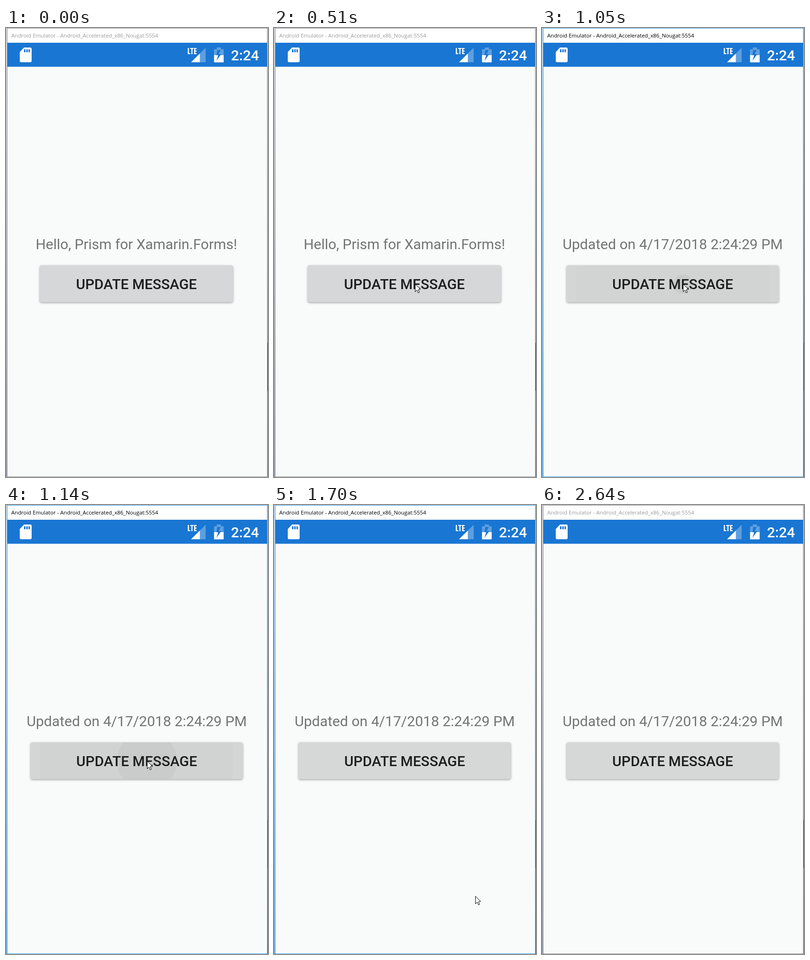
Recreate the animation shown at these times as an HTML page with a canvas. Size 552 px wide and 944 px high, loop 2.86 s.

```html
<!DOCTYPE html>
<html lang="en">
<head>
<meta charset="utf-8">
<title>Emulator</title>
<style>
html, body { margin: 0; width: 100%; height: 100%; overflow: hidden; background: #f9fbfa; }
canvas { display: block; width: 552px; height: 944px; }
</style>
</head>
<body>
<canvas id="stage" width="552" height="944"></canvas>
<script>
const ctx = document.getElementById('stage').getContext('2d');
const LOOP = 2860, W = 552, H = 944;
const ENTER = 130, REST = 510, FOCUS = 740, CLICK = 1050, MOVE = 1130,
  SPREAD = 1380, CALM = 1530, GONE = 2000, BLUR = 2640;
const BLUE = '#1976d3', PAGE = '#f9fbfa', FADED = 'rgba(255,255,255,.3)';

const clamp = v => Math.min(1, Math.max(0, v));
const part = (t, from, to) => clamp((t - from) / (to - from));
const lerp = (a, b, k) => a + (b - a) * k;
const black = alpha => `rgba(0,0,0,${alpha})`;

// Hold the time so that [from, to] plays in equal steps
function hold(t, from, to, steps) {
  if (t < from || t >= to) return t;
  const step = (to - from) / steps;
  return from + Math.floor((t - from) / step) * step;
}

function rect(x, y, w, h, color) {
  ctx.fillStyle = color;
  ctx.fillRect(x, y, w, h);
}

function round(x, y, w, h, r, color) {
  ctx.beginPath();
  ctx.roundRect(x, y, w, h, r);
  ctx.fillStyle = color;
  ctx.fill();
}

function poly(points, color) {
  ctx.beginPath();
  points.forEach(([x, y]) => ctx.lineTo(x, y));
  ctx.closePath();
  ctx.fillStyle = color;
  ctx.fill();
}

function text(str, x, y, font, color, align = 'left') {
  ctx.font = font;
  ctx.fillStyle = color;
  ctx.textAlign = align;
  ctx.fillText(str, x, y);
}

function fade(x, y, w, h, from, to) {
  const g = ctx.createLinearGradient(0, y, 0, y + h);
  g.addColorStop(0, from);
  g.addColorStop(1, to);
  rect(x, y, w, h, g);
}

function drawWindow(active) {
  rect(0, 0, W, H, PAGE);
  // Slivers of the desktop beside the window
  fade(0, 0, 2, H, active ? '#d3dde6' : '#d9dadc', active ? '#7fb0d8' : '#9a9fb0');
  fade(551, 0, 1, H, active ? '#a8cdea' : '#d2d4d8', active ? '#2673b5' : '#7d8294');
  rect(551, 662, 1, 101, active ? '#0d5ca5' : '#3d4256');
  rect(3, 1, 547, 30, '#fff');
  ctx.strokeStyle = active ? '#2f9fec' : '#8c9097';
  ctx.lineWidth = 1;
  ctx.strokeRect(2.5, .5, 548, 943);
  text('Android Emulator - Android_Accelerated_x86_Nougat:5554', 11, 20,
    '11.36px "Open Sans", "Noto Sans", sans-serif', active ? '#000' : '#999');
}

function drawCard() {
  round(29, 41, 25, 31, 3, '#fff');
  poly([[28, 40], [38, 40], [38, 41], [29, 50.5], [28, 51]], BLUE);
  for (let i = 0; i < 3; i++) rect(38 + i * 4.7, 44.8, 3, 6.2, BLUE);
}

function drawSignal() {
  const x = 390, y = 72, size = 30.6;
  const wedge = (s, color) => poly([[x, y], [x + s, y - s], [x + s, y]], color);
  wedge(size, FADED);
  wedge(size * .6, '#fff');
  // LTE: three stems, then the bars
  const bar = (left, top, w) => rect(left, top, w, 2.2, '#fff');
  for (const stem of [383, 390.5, 396.4]) rect(stem, 42, 2.4, 13, '#fff');
  bar(383, 52.8, 5.2);
  bar(388.2, 42, 7);
  for (let i = 0; i < 3; i++) bar(396.4, 42 + i * 5.4, 5.2);
}

function drawBattery() {
  const x = 438.3, y = 41, w = 20.3, h = 31.2, level = 57;
  rect(x + w * .28, y, w * .44, h * .12, FADED);
  rect(x, y + h * .12, w, level - y - h * .12, FADED);
  round(x, level, w, y + h - level, [0, 0, 1, 1], '#fff');
  const bolt = [[.17, 0], [.89, 0], [.45, .37], [1, .37], [0, 1], [.36, .48], [0, .48]];
  poly(bolt.map(([u, v]) => [x + w * (.25 + u / 2), y + h * (.167 + v * .733)]), BLUE);
}

function drawStatus() {
  rect(3, 31, 547, 50.5, BLUE);
  drawCard();
  drawSignal();
  drawBattery();
  text('2:24', 474, 68, '500 30px Roboto, sans-serif', '#fff');
}

// The touch wave grows inside the button's old bounds, then fades
function drawRipple(t) {
  if (t < CLICK || t >= CALM) return;
  const k = part(t, CLICK, SPREAD), rest = 1 - part(t, SPREAD, CALM);
  rect(52, 499, 447, 78, black(.008 * rest));
  round(72, 499, 407, 77.3, 4, black(lerp(.008, .035, k) * rest));
  ctx.clip();
  ctx.beginPath();
  ctx.arc(297, 538, lerp(20, 200, k), 0, Math.PI * 2);
  ctx.fillStyle = black(lerp(.045, .012, k) * rest);
  ctx.fill();
}

function drawContent(t) {
  const updated = t >= CLICK;
  const mid = updated ? 275.3 : 274.7, w = updated ? 447 : 407;
  const label = updated ? 'Updated on 4/17/2018 2:24:29 PM' : 'Hello, Prism for Xamarin.Forms!';
  text(label, mid, 465, `${updated ? 30.1 : 29.9}px Roboto, sans-serif`, '#737474', 'center');

  ctx.save();
  ctx.shadowColor = black(.36);
  ctx.shadowBlur = 4;
  ctx.shadowOffsetY = 1.5;
  round(mid - w / 2, 499, w, 77.3, 4, updated ? '#d6d8d7' : '#d6d7d9');
  ctx.shadowColor = 'transparent';
  ctx.clip();
  drawRipple(t);
  ctx.restore();

  text('UPDATE MESSAGE', mid, 549, '500 29.9px Roboto, sans-serif', '#1d1e1e', 'center');
}

function pointerAt(t) {
  if (t < MOVE) {
    const k = 1 - (1 - part(t, ENTER, REST)) ** 2.7;
    return [lerp(407, 297, k), lerp(821, 538, k)];
  }
  const u = part(t, MOVE, GONE), k = u * u * (3 - 2 * u);
  return [lerp(297, 507, k ** 1.4), lerp(538, 945, k)];
}

function drawPointer(t) {
  if (t < ENTER || t >= GONE) return;
  const [x, y] = pointerAt(t).map(Math.round);
  ctx.save();
  ctx.translate(x + .5, y + .5);
  poly([[0, 0], [0, 16], [3.7, 12.6], [6.3, 18.3], [8.8, 17.2], [6.3, 11.6], [11, 11.2]], '#fff');
  ctx.lineWidth = 1;
  ctx.strokeStyle = '#000';
  ctx.stroke();
  ctx.restore();
}

function draw(now) {
  const t = hold(hold(now % LOOP, ENTER, REST, 5), CLICK, GONE, 12);
  drawWindow(t >= FOCUS && t < BLUR);
  drawStatus();
  drawContent(t);
  drawPointer(t);
}

const start = performance.now();
function loop() {
  draw(performance.now() - start);
  requestAnimationFrame(loop);
}
loop();
</script>
</body>
</html>
```
